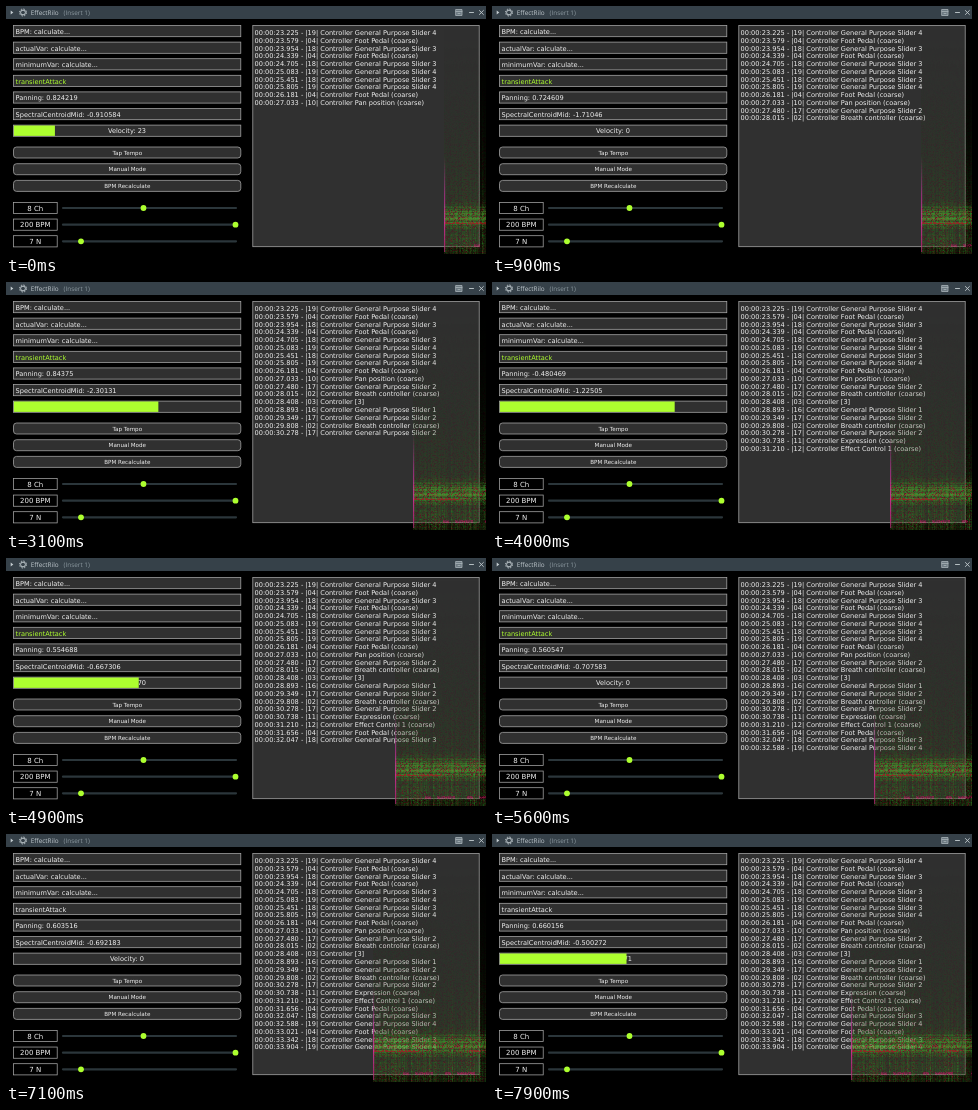
Animation of 480 by 248 pixels, one loop 8000 ms. Source, as an HTML page with a canvas:

```html
<!DOCTYPE html>
<html lang="en">
<head>
<meta charset="utf-8">
<title>MIDI controller panel</title>
<style>
  html, body { margin: 0; width: 100%; height: 100%; overflow: hidden; background: #000; }
  #stage { position: absolute; left: 0; top: 0; width: 480px; height: 248px; overflow: hidden; background: #000; }
  svg, canvas { position: absolute; left: 0; top: 0; }
  text { font-family: "DejaVu Sans", sans-serif; font-size: 6.6px; fill: #f0f0f0; text-rendering: geometricPrecision; white-space: pre; }
</style>
</head>
<body>
<div id="stage">
  <svg id="ui" width="480" height="248" viewBox="0 0 480 248"></svg>
  <canvas id="spectrum" width="480" height="248"></canvas>
</div>
<script>
const LOOP = 8000, STEP = 100;
const CLOCK_START = 27.25;   // log clock when the loop begins
const SPEED = 9.95;          // spectrogram scroll, px per second
const FRONT = 437.8;         // spectrogram edge when the loop begins
const ATTACK_END = 5800;
const LIME = '#adff2f', PANEL = '#303030', EDGE = '#a8a8a8', ICON = '#c3ccd0';

// log text: seconds and controller code
const LOG = `23.225 19, 23.579 04, 23.954 18, 24.339 04, 24.705 18, 25.083 19, 25.451 18, 25.805 19, 26.181 04,
  27.033 10, 27.480 17, 28.015 02, 28.408 03, 28.893 16, 29.349 17, 29.808 02, 30.278 17, 30.738 11, 31.210 12,
  31.656 04, 32.047 18, 32.588 19, 33.021 04, 33.342 18, 33.904 19`
  .split(',').map(entry => entry.trim().split(' '));
const NAMES = {
  '02': 'Breath controller (coarse)', '03': '[3]', '04': 'Foot Pedal (coarse)',
  '10': 'Pan position (coarse)', '11': 'Expression (coarse)', '12': 'Effect Control 1 (coarse)'
};
const controller = code => NAMES[code] || `General Purpose Slider ${code - 15}`;

const KEYS = [
  { at: 0, pan: 0.824219, mid: -0.910584, vel: 23 },
  { at: 1700, pan: 0.523438, mid: -3.31021, vel: 71 },
  { at: 3100, pan: 0.84375, mid: -2.30131, vel: 81 },
  { at: 4000, pan: -0.480469, mid: -1.22505, vel: 98 },
  { at: 4900, pan: 0.554688, mid: -0.667306, vel: 70 },
  { at: 6300, pan: 0.574219, mid: -0.788138, vel: 0 },
  { at: 7900, pan: 0.660156, mid: -0.500272, vel: 71 }
];

// Readings move from key to key in three jumps; a long gap releases the note on the middle one.
function reading(ms) {
  const i = KEYS.findLastIndex(key => key.at <= ms);
  const a = KEYS[i], b = KEYS[i + 1] || a;
  const gap = b.at - a.at || LOOP;
  const third = Math.floor((ms - a.at) / gap * 3);
  const mix = name => a[name] + (b[name] - a[name]) * third / 3;
  if (!third) return a;
  return {
    pan: +(Math.round(mix('pan') * 512) / 512).toPrecision(6),
    mid: +mix('mid').toPrecision(6),
    vel: third === 1 && gap > 1000 ? 0 : Math.round(mix('vel'))
  };
}

const ui = document.getElementById('ui');
function add(tag, attrs, content) {
  const el = document.createElementNS('http://www.w3.org/2000/svg', tag);
  for (const key in attrs) el.setAttribute(key, attrs[key]);
  if (content !== undefined) el.textContent = content;
  return ui.appendChild(el);
}
const label = (x, y, content, more) => add('text', { x, y, ...more }, content);
const centred = (x, y, content, size) =>
  label(x, y, content, { 'text-anchor': 'middle', style: `font-size:${size}px` });
const box = (x, y, width, height, fill, rx = 0) =>
  add('rect', { x, y, width, height, fill, rx, stroke: EDGE, 'stroke-width': 0.75 });
const line = (d, stroke = ICON, width = 0.9) =>
  add('path', { d, stroke, 'stroke-width': width, fill: 'none', 'stroke-linecap': 'round' });

// title bar
add('rect', { width: 480, height: 13, fill: '#364149' });
add('path', { d: 'M4.7 4.4 L7.3 6.5 L4.7 8.6Z', fill: ICON });
const ring = { cx: 17, cy: 6.5, fill: 'none', stroke: ICON, 'stroke-width': 1 };
add('circle', { ...ring, r: 2.4 });
add('circle', { ...ring, r: 3.5, 'stroke-dasharray': '1.4 1.349' });
const titleFont = 'font-family:"Open Sans",sans-serif;font-size:6.4px;';
label(24.8, 8.7, 'EffectRilo', { style: titleFont + 'fill:#c0c9ce' });
label(57.6, 8.7, '(Insert 1)', { style: titleFont + 'fill:#8b989f' });
add('rect', { x: 450, y: 3.5, width: 6, height: 6, fill: '#6d7a82' });
line('M450 3.5h6v6h-6z M450 5.5h6 M452 7.5h2', '#aab4b9', 0.8);
line('M463.5 6.5h4');
line('M473.4 4.5l4 4 m0 -4l-4 4');

// readouts
const rowY = i => 19.5 + i * 16.6;
const fields = ['BPM: calculate...', 'actualVar: calculate...', 'minimumVar: calculate...', 'transientAttack', '', '']
  .map((content, i) => {
    box(7.5, rowY(i), 227.3, 11.2, PANEL);
    return label(9.6, rowY(i) + 8.4, content);
  });
const [, , , attack, panning, centroid] = fields;

box(7.5, rowY(6), 227.3, 11.2, PANEL);
const velocity = centred(121, rowY(6) + 8.2, '', 6.6);
const meter = add('rect', { x: 7.9, y: rowY(6) + 0.4, height: 10.4, fill: LIME });

['Tap Tempo', 'Manual Mode', 'BPM Recalculate'].forEach((name, i) => {
  const y = 141 + i * 16.7;
  box(7.5, y, 227.3, 11, PANEL, 3);
  centred(121.3, y + 7.5, name, 5.6);
});

[['8 Ch', 137.5], ['200 BPM', 229.5], ['7 N', 75]].forEach(([name, x], i) => {
  const y = 202 + i * 16.65;
  box(7.5, y - 5.6, 43.7, 11.2, '#000');
  centred(29.3, y + 2.6, name, 7);
  line(`M57 ${y}H230`, '#2b363b', 2.2);
  add('circle', { cx: x, cy: y, r: 2.9, fill: LIME });
});

// message log
box(246.8, 19.5, 226.4, 221.2, PANEL);
const messages = LOG.map(([time, code], i) =>
  label(248.5, 29 + i * 7.77, `00:00:${time} - |${code}| Controller ${controller(code)}`));

// spectrogram strip, one column per pixel of scroll
const STRIP = 124, TOP = 20;
const noise = (x, y) => {
  const v = Math.sin(x * 127.1 + y * 311.7) * 43758.5453;
  return v - Math.floor(v);
};
const bump = (y, centre, width) => Math.exp(-(((y - centre) / width) ** 2));
const hits = LOG.map(([time]) => (time - LOG[0][0]) * SPEED);

function cell(x, y) {
  const depth = (y - TOP) / (248 - TOP);
  const n = noise(x, y), row = noise(7, y), column = noise(x, 3);
  const hit = Math.max(...hits.map(h => x >= h - 0.5 ? Math.exp((h - x) / 2.5) : 0));
  const tone = bump(y, 210, 9) * (0.15 + 0.3 * row + 0.3 * n);
  const haze = depth ** 2 * (0.08 + 0.2 * column + 0.18 * n * row + 0.25 * hit * n);
  const held = x < 30 || noise(Math.floor(x / 12), 5) > 0.4;
  const red = bump(y, 216.5, 1.3) * (held ? 0.75 : 0.25);
  const bass = x > 25 && noise(Math.floor(x / 6), 11) > 0.4 ? 0.6 * bump(y, 239, 1.8) * (0.4 + n) : 0;
  const power = tone + haze;
  if (red + bass > power) return [bass > red ? 340 : 5, 70, 42, Math.min(0.8, red + bass)];
  const warm = noise(x + 31, y) < 0.25;
  return [warm ? 5 : 70 + 50 * n, 55, 13 + 32 * power, Math.min(0.75, 0.2 * depth + power)];
}

function makeStrip() {
  const strip = document.createElement('canvas');
  strip.width = STRIP;
  strip.height = 248;
  const pen = strip.getContext('2d');
  for (let x = 0; x < STRIP; x++) {
    for (let y = TOP; y < 248; y++) {
      const [hue, saturation, light, alpha] = cell(x, y);
      pen.fillStyle = `hsla(${hue},${saturation}%,${light}%,${alpha})`;
      pen.fillRect(x, y, 1, 1);
    }
  }
  const glow = pen.createLinearGradient(0, 150, 0, 246);
  glow.addColorStop(0, 'rgba(170,90,160,0)');
  glow.addColorStop(0.4, 'rgba(200,50,165,0.6)');
  glow.addColorStop(0.7, 'rgba(225,40,160,0.8)');
  glow.addColorStop(1, 'rgba(215,30,140,0.55)');
  pen.fillStyle = glow;
  pen.fillRect(0, 150, 1.2, 96);
  return strip;
}
const strip = makeStrip();
const screen = document.getElementById('spectrum').getContext('2d');

function draw(ms) {
  const { pan, mid, vel } = reading(ms);
  panning.textContent = 'Panning: ' + pan;
  centroid.textContent = 'SpectralCentroidMid: ' + mid;
  velocity.textContent = 'Velocity: ' + vel;
  meter.setAttribute('width', vel / 127 * 226.5);
  attack.style.fill = ms < ATTACK_END ? LIME : '';

  const clock = CLOCK_START + ms / 1000;
  messages.forEach((el, i) => {
    el.style.visibility = LOG[i][0] <= clock ? 'visible' : 'hidden';
  });

  screen.clearRect(0, 0, 480, 248);
  screen.drawImage(strip, Math.round(FRONT - SPEED * ms / 1000), 0);
}

const start = performance.now();
let shown = -1;
function tick() {
  const now = Math.max(0, performance.now() - start) % LOOP;
  const ms = Math.floor(now / STEP) * STEP;
  if (ms !== shown) draw(shown = ms);
  requestAnimationFrame(tick);
}
tick();
</script>
</body>
</html>
```
